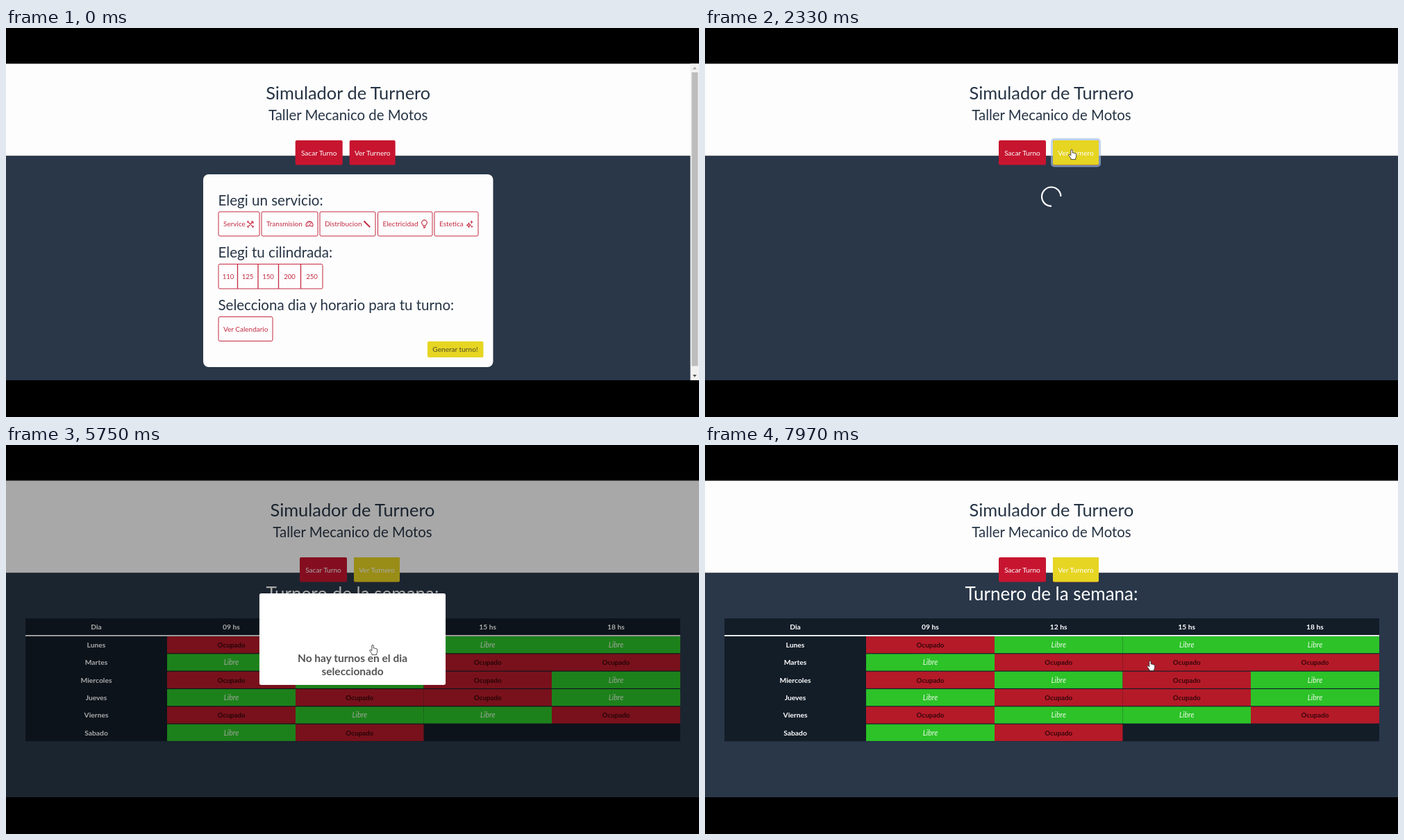
Recreate the animation shown at these times as an HTML page. Size 998 by 561 pixels, loop 7.99 s.

```html
<!DOCTYPE html>
<html lang="es">
<head>
<meta charset="utf-8">
<title>Simulador de Turnero</title>
<style>
  html, body { margin: 0; width: 100%; height: 100%; overflow: hidden; background: #000; }
  svg { display: block; width: 100%; height: 100%; font-family: Lato, "Open Sans", sans-serif; }
  .mid { text-anchor: middle; }
  .line { fill: none; stroke: #c42b42; }
  .icon { fill: none; stroke: #c42b42; stroke-width: 1.1; stroke-linecap: round; stroke-linejoin: round; }
</style>
</head>
<body>
<svg id="stage" viewBox="0 0 998 561" xmlns="http://www.w3.org/2000/svg"></svg>
<script>
const LOOP = 7990;
const T = { hover: 1190, focus: 1420, load: 1480, table: 2470, blur: 5550, open: 5707, close: 6906 };
const NAVY = '#293749', INK = '#263445', RED = '#c71530', YELLOW = '#e6d522', DARK = '#131d28', PAPER = '#fdfdfd';

const rect = (x, y, w, h, fill, more = '') =>
  `<rect x="${x}" y="${y}" width="${w}" height="${h}" fill="${fill}" ${more}/>`;
const text = (x, y, size, fill, str, more = '') =>
  `<text x="${x}" y="${y}" font-size="${size}" fill="${fill}" ${more}>${str}</text>`;
const mid = 'class="mid"';
const bold = 'class="mid" font-weight="700"';

function header() {
  return text(499, 103, 25.4, INK, 'Simulador de Turnero', mid) +
    text(499, 133, 20.4, INK, 'Taller Mecanico de Motos', mid) +
    rect(423, 162, 68, 35.5, RED, 'rx="2"') +
    text(457, 184, 10.1, '#fff', 'Sacar Turno', mid) +
    rect(499.5, 160.5, 69, 38.5, 'none', 'id="ring" rx="3.5" stroke="#a3bde6" stroke-opacity=".65" stroke-width="3"') +
    rect(501, 162, 66, 35.5, RED, 'rx="2"') +
    rect(501, 162, 66, 35.5, YELLOW, 'id="hot" rx="2"') +
    text(534, 184, 10.1, '#fff', 'Ver Turnero', mid);
}

const icons = {
  tools: 'M-4 -4L4 4M3 4.6L4.6 3M4 -4L-3.5 3.5M-4.6 -3L-3 -4.6M2 -4.6V-2H4.6M-4.5 3L-3 4.5',
  gauge: 'M-4.4 3.2A5 5 0 1 1 4.4 3.2Q0 1.2 -4.4 3.2ZM0 1L2.6 -2M-3 0H-2.6M0 -3.2V-2.8M-2 -2L-1.8 -1.8',
  wrench: 'M-4.6 -3.6L-3.6 -4.6L-2 -2.6L2 1.4L4.2 3.4L3.4 4.2L1.4 2L-2.6 -2Z',
  bulb: 'M-1.6 2.4Q-1.6 1.2 -2.8 .2A3.7 3.7 0 1 1 2.8 .2Q1.6 1.2 1.6 2.4ZM-1.4 4.2H1.4M-.6 5.3H.6',
  stars: 'M-1 -2Q-.6 1 2 1.3Q-.6 1.6 -1 4.6Q-1.4 1.6 -4 1.3Q-1.4 1 -1 -2ZM3 -4.8V-1.6M1.4 -3.2H4.6M3.4 2.6V4.2M2.6 3.4H4.2'
};

function form() {
  const outline = (x, y, w, label) =>
    `<rect class="line" x="${x + .5}" y="${y + .5}" width="${w - 1}" height="35" rx="2"/>` +
    text(x + 7.5, y + 21.5, 10, '#c42b42', label);
  const services = [
    [305.5, 60, 'Service', 352, 'tools'], [367.5, 82, 'Transmision', 437, 'gauge'],
    [451.5, 81, 'Distribucion', 520, 'wrench'], [535, 79.5, 'Electricidad', 602.5, 'bulb'],
    [616.5, 64, 'Estetica', 667.5, 'stars']
  ];
  const sizes = [[320, '110'], [348, '125'], [377.5, '150'], [408.5, '200'], [440.5, '250']];
  return rect(284, 211, 417.5, 278, PAPER, 'rx="8"') +
    text(305.5, 256, 20.6, INK, 'Elegi un servicio:') +
    services.map(([x, w, label, ix, name]) => outline(x, 264.5, w, label) +
      `<path class="icon" transform="translate(${ix} 283)" d="${icons[name]}"/>`).join('') +
    text(305.5, 331, 20.6, INK, 'Elegi tu cilindrada:') +
    '<rect class="line" x="306" y="340.5" width="150" height="35.5" rx="2"/>' +
    '<path class="line" stroke-width="1.3" d="M333.5 340V376M363 340V376M392.5 340V376M424.5 340V376"/>' +
    sizes.map(([x, n]) => text(x, 362, 9.6, '#c42b42', n, mid)).join('') +
    text(305.5, 407, 20.5, INK, 'Selecciona dia y horario para tu turno:') +
    outline(305.5, 416, 79, 'Ver Calendario') +
    rect(607, 452, 80.5, 23, YELLOW, 'rx="2"') +
    text(647, 467.3, 10.1, '#4f4c2a', 'Generar turno!', mid);
}

function scrollbar() {
  return rect(985.5, 51.5, 12.5, 456.5, '#f1f1f1') + rect(987.5, 64, 9, 423.5, '#bdbdbd') +
    '<path fill="#a5a5a5" d="M989 59.5L991.8 56L994.6 59.5Z"/>' +
    '<path fill="#505050" d="M989 500L994.6 500L991.8 503.5Z"/>';
}

function table() {
  const cols = [28, 232, 417, 601.5, 786, 971];
  const center = i => (cols[i] + cols[i + 1]) / 2;
  const days = { Lunes: 'OLLL', Martes: 'LOOO', Miercoles: 'OLOL', Jueves: 'LOOL', Viernes: 'OLLO', Sabado: 'LO' };
  let out = text(499, 224, 26, '#fff', 'Turnero de la semana:', mid) + rect(28, 250, 943, 177.3, DARK);
  ['Dia', '09 hs', '12 hs', '15 hs', '18 hs'].forEach((s, i) => {
    out += text(center(i), 265.5, 10.3, '#fff', s, bold);
  });
  out += rect(28, 274, 943, 1.8, '#fff');
  Object.entries(days).forEach(([day, slots], r) => {
    const y = 276 + 25.35 * r;
    out += text(center(0), y + 15.8, 10.3, '#fff', day, bold);
    [...slots].forEach((s, i) => {
      const free = s === 'L', c = i + 1;
      out += rect(cols[c], y, cols[c + 1] - cols[c], 24.2, free ? '#2cc228' : '#b51a28') +
        (free ? text(center(c), y + 15.8, 10.6, '#eaf9e6', 'Libre', mid + ' font-style="italic"')
              : text(center(c), y + 15.8, 9.8, '#35060b', 'Ocupado', bold));
    });
  });
  return out;
}

// Drawn around its own centre so it can scale in place
function popup() {
  return rect(-149.5, -73.5, 299, 147, '#fff', 'rx="3"') +
    '<g id="sign"><circle r="22.2" fill="none" stroke="#facea8" stroke-width="2.3"/>' +
    text(0, 12.5, 35, '#f8bb86', '!', mid) + '</g>' +
    text(0, 37, 17.3, '#545454', 'No hay turnos en el dia', bold) +
    text(0, 58.5, 17.3, '#545454', 'seleccionado', bold);
}

const stage = document.getElementById('stage');
stage.innerHTML =
  rect(0, 51.5, 998, 133, PAPER) + rect(0, 184.5, 998, 323.5, NAVY) +
  `<g id="head">${header()}</g>` +
  `<g id="form">${form()}${scrollbar()}</g>` +
  '<path id="spin" fill="none" stroke="#fff" stroke-width="2.2" d="M9.7 9.7A13.7 13.7 0 1 1 9.7 -9.7"/>' +
  `<g id="table">${table()}</g>` +
  rect(0, 51.5, 998, 456.5, '#000', 'id="shade"') +
  `<g id="popup">${popup()}</g>` +
  '<g id="cursor" stroke="#222" stroke-width=".8" fill="#fff" stroke-linejoin="round">' +
  '<path id="arrow" d="M0 0V10.6L2.4 8.4L4.1 12.2L5.9 11.4L4.2 7.7H7.4Z"/>' +
  '<path id="hand" d="M-1.2 1Q0 -.8 1.2 1V5Q2.2 4.3 3 5.4Q4.2 4.7 4.9 5.9Q6.6 5.4 6.7 7.2V10Q6.7 11.6 5.6 12.8V14.6H-1V13Q-2.6 11.4 -4.3 8.4Q-4.2 6.8 -2.6 7.6L-1.2 9Z"/></g>';

const el = {};
stage.querySelectorAll('[id]').forEach(n => el[n.id] = n);

const clamp = x => Math.max(0, Math.min(1, x));
const ramp = (t, start, dur) => clamp((t - start) / dur);
const mix = (a, b, k) => a + (b - a) * k;
const show = (node, on) => node.setAttribute('display', on ? 'inline' : 'none');
const set = (node, value) => node.setAttribute('transform', value);
const fade = (node, k) => node.setAttribute('opacity', k);

// CSS "ease": cubic-bezier(.25, .1, .25, 1)
function ease(x) {
  const bez = (a, b, s) => 3 * a * s * (1 - s) ** 2 + 3 * b * s * s * (1 - s) + s ** 3;
  let lo = 0, hi = 1;
  for (let i = 0; i < 20; i++) {
    const s = (lo + hi) / 2;
    if (bez(.25, .25, s) < x) lo = s; else hi = s;
  }
  return bez(.1, 1, lo);
}

function popScale(k) {
  if (k < .45) return mix(.7, 1.05, ease(k / .45));
  if (k < .8) return mix(1.05, .95, ease((k - .45) / .35));
  return mix(.95, 1, ease((k - .8) / .2));
}

const path = [
  [350, 1004, 330], [1260, 528, 175], [2500, 528, 175], [3060, 776, 205], [3350, 776, 205],
  [4200, 718, 244], [4420, 718, 244], [5250, 528, 288], [7450, 528, 288], [7950, 641, 311]
];

function pointer(t) {
  let i = path.findIndex(p => p[0] > t);
  if (i === 0) return path[0].slice(1);
  if (i < 0) return path[path.length - 1].slice(1);
  const a = path[i - 1], b = path[i];
  let k = (t - a[0]) / (b[0] - a[0]);
  k = k * k * (3 - 2 * k);
  return [mix(a[1], b[1], k), mix(a[2], b[2], k)];
}

function draw(t) {
  const loading = t >= T.load, ready = t >= T.table;
  set(el.head, `translate(${loading ? 0 : -6.3} 0)`);
  show(el.form, !loading);
  show(el.spin, loading && !ready);
  set(el.spin, `translate(498.7 243.2) rotate(${(t - T.load - 10) / 750 * 360})`);
  show(el.table, ready);
  fade(el.hot, ease(ramp(t, T.hover, 150)));
  fade(el.ring, ease(ramp(t, T.focus, 150)) - ease(ramp(t, T.blur, 150)));

  const out = ease(ramp(t, T.close, 150));
  fade(el.shade, .4 * (ease(ramp(t, T.open, 80)) - ease(ramp(t, T.close, 100))));
  show(el.popup, t >= T.open && out < 1);
  fade(el.popup, 1 - out);
  set(el.popup, `translate(499 280) scale(${popScale(ramp(t, T.open, 300)) * mix(1, .5, out)})`);
  const turn = ease(ramp(t, T.open, 500));
  fade(el.sign, turn);
  set(el.sign, `translate(0 -26.5) scale(1 ${Math.cos((1 - turn) * 100 * Math.PI / 180)})`);

  const [x, y] = pointer(t);
  const onButton = x > 501 && x < 567 && y > 162 && y < 197;
  const onCell = ready && x > 232 && x < 971 && y > 276 && y < 427;
  show(el.cursor, t > path[0][0]);
  set(el.cursor, `translate(${x} ${y})`);
  show(el.hand, onButton || onCell);
  show(el.arrow, !onButton && !onCell);
}

const start = performance.now();
function tick() {
  draw((performance.now() - start) % LOOP);
  requestAnimationFrame(tick);
}
tick();
</script>
</body>
</html>
```
